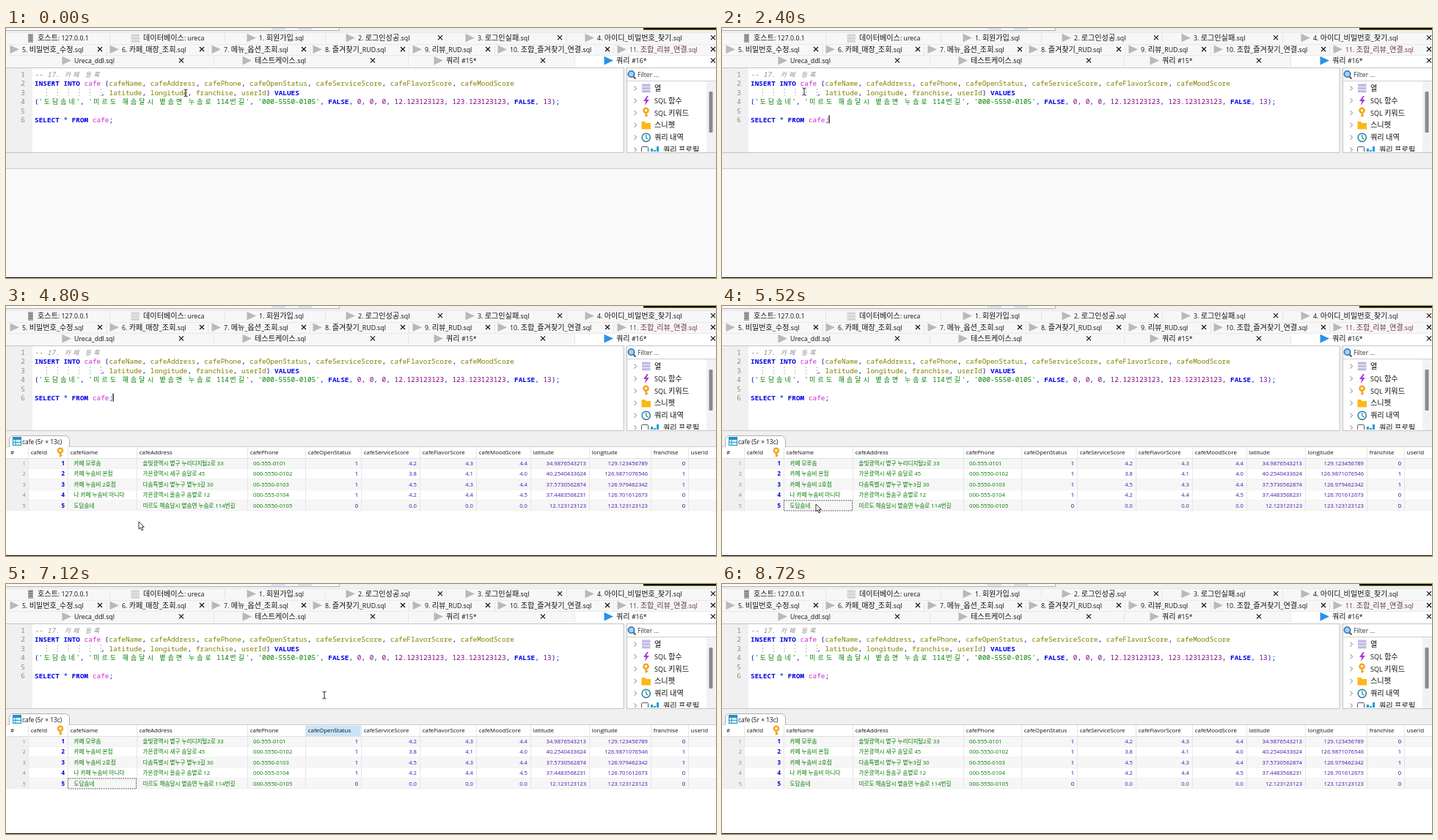
An HTML page for the animation above (8.8 s loop, 968 by 342 pixels).

```html
<!DOCTYPE html>
<html lang="ko">
<head>
<meta charset="utf-8">
<style>
html, body { margin: 0; width: 100%; height: 100%; overflow: hidden; background: #f0f0f0; }
svg { display: block; width: 968px; height: 342px; }
text { white-space: pre; font-family: "Open Sans", "Noto Sans CJK KR", "Noto Sans CJK", sans-serif; }
.code { font-family: "Noto Sans Mono", "Noto Sans CJK KR", "Noto Sans CJK", monospace; }
</style>
</head>
<body>
<svg id="stage" viewBox="0 0 968 342" xmlns="http://www.w3.org/2000/svg"></svg>
<script>
const NS = "http://www.w3.org/2000/svg";
const stage = document.getElementById("stage");
const LOOP = 8800, STEP = 80;

function add(parent, tag, attrs, content) {
  const el = document.createElementNS(NS, tag);
  for (const k in attrs) el.setAttribute(k, attrs[k]);
  if (content !== undefined) el.textContent = content;
  parent.appendChild(el);
  return el;
}
const rect = (p, x, y, width, height, fill, more) => add(p, "rect", { x, y, width, height, fill, ...more });
const path = (p, d, stroke, w = 1, fill = "none") => add(p, "path", { d, stroke, "stroke-width": w, fill });
const group = (p, attrs = {}) => add(p, "g", attrs);

// Hangul runs may take their own size beside the Latin text.
function label(p, x, y, str, size = 8.8, hangul = 10.15, fill = "#111", more = {}) {
  const el = add(p, "text", { x, y, fill, "font-size": size, ...more });
  for (const run of str.split(/([\uac00-\ud7a3]+)/)) {
    if (!run) continue;
    add(el, "tspan", /[\uac00-\ud7a3]/.test(run) ? { "font-size": hangul } : {}, run);
  }
  return el;
}

/* ---------- top strip and tabs ---------- */
rect(stage, 0, 0, 968, 342, "#f0f0f0");
rect(stage, 0, 0, 454, 3, "#f8f8f8");
rect(stage, 362, 0, 19, 2.5, "#cfe3fa");
rect(stage, 398, 0, 19, 2.5, "#cfe3fa");
path(stage, "M0 3.5H454.5V0", "#b4b4b4");
rect(stage, 869, 0, 99, 2, "#000");
rect(stage, 869, 2, 99, 1, "#8a9a20");
rect(stage, 0, 6, 968, 48, "#f7f7f7");
rect(stage, 776, 37, 192, 17, "#fff");
path(stage, "M0 6.5H968M0 22.5H968M0 37.5H968", "#e9e9e9");

const tabRows = [
  [19.5, 17.2, [141, 298, 435, 600, 764]],
  [37, 33, [137, 275, 414, 549, 666, 828]],
  [52, 48.3, [283, 548, 775]]
];
tabRows.forEach(([bottom, , xs]) => xs.forEach(x => path(stage, `M${x}.5 ${bottom - 12}V${bottom}`, "#e4e4e4")));

const tabs = [
  [0, 345, "1. 회원가입.sql"], [0, 480, "2. 로그인성공.sql", 592],
  [0, 643, "3. 로그인실패.sql", 755], [0, 806, "4. 아이디_비밀번호_찾기.sql", 964],
  [1, 22, "5. 비밀번호_수정.sql", 128], [1, 158, "6. 카페_매장_조회.sql", 267],
  [1, 297, "7. 메뉴_옵션_조회.sql", 406], [1, 435, "8. 즐겨찾기_RUD.sql", 541],
  [1, 571, "9. 리뷰_RUD.sql", 657], [1, 687, "10. 조합_즐겨찾기_연결.sql", 820],
  [1, 850, "11. 조합_리뷰_연결.sql", 964, "#6b3350"],
  [2, 93, "Ureca_ddl.sql", 239], [2, 339, "테스트케이스.sql", 500],
  [2, 600, "쿼리 #15*", 732], [2, 832, "쿼리 #16*", 964]
];
tabs.forEach(([row, x, str, close, color], i) => {
  const y = tabRows[row][1], active = i === tabs.length - 1;
  path(stage, `M${x - 16.5} ${y - 9.5}l12.5 5.8l-12.5 5.8z`, "none", 0, active ? "#2692ee" : "#b9b9b9");
  label(stage, x, y, str, 8.8, 10.15, color);
  if (close) path(stage, `M${close - 3} ${y - 7}l6 6m0 -6l-6 6`, "#111", 1.2);
});
label(stage, 43, 17.2, "호스트: 127.0.0.1");
label(stage, 187, 17.2, "데이터베이스: ureca");
rect(stage, 30, 8, 7, 12, "#a8a8a8");
path(stage, "M31 10.5H36M31 13.5H36M31 16.5H36", "#666");
for (let i = 0; i < 3; i++) rect(stage, 170.5, 8.5 + i * 4, 11.5, 3.2, "#d3d3cf");

/* ---------- editor ---------- */
rect(stage, 0, 54.5, 842, 116, "#fff", { stroke: "#c4c4c4" });
rect(stage, 0, 55, 36, 115, "#f0f0f0");

const CW = 5.638, X0 = 39, lineY = n => 67 + n * 12.45;
const keywords = /^(INSERT|INTO|VALUES|FALSE|SELECT|FROM)$/;
const lines = [
  "-- 17. 카페 등록",
  "INSERT INTO cafe (cafeName, cafeAddress, cafePhone, cafeOpenStatus, cafeServiceScore, cafeFlavorScore, cafeMoodScore",
  "                , latitude, longitude, franchise, userId) VALUES",
  "('도담솜네', '미르도 해솜달시 볕솜면 누솜로 114번길', '000-5550-0105', FALSE, 0, 0, 0, 12.123123123, 123.123123123, FALSE, 13);",
  "",
  "SELECT * FROM cafe;"
];
function styleOf(tok) {
  if (tok[0] === "'") return { fill: "#008000" };
  if (keywords.test(tok)) return { fill: "#0000e6", "font-weight": 700 };
  if (tok === "cafe") return { fill: "#d028d0" };
  if (/^[a-z]/i.test(tok)) return { fill: "#808000" };
  if (/^\d/.test(tok)) return { fill: "#800080" };
  return { fill: "#0000c8" };
}
// Hangul fills two columns, everything else one.
function putRun(str, col, y, style) {
  for (const part of str.match(/[\uac00-\ud7a3]|[^\uac00-\ud7a3]+/g)) {
    const wide = /[\uac00-\ud7a3]/.test(part);
    add(stage, "text", {
      x: X0 + col * CW + (wide ? 1.4 : 0), y, class: "code",
      "font-size": wide ? 8.8 : CW / 0.6, ...style
    }, part);
    col += wide ? 2 : part.length;
  }
  return col;
}
lines.forEach((line, n) => {
  const y = lineY(n);
  add(stage, "text", { x: 26, y, class: "code", fill: "#8a8a8a", "font-size": 9.4, "text-anchor": "end" }, n + 1);
  if (line.startsWith("--")) {
    putRun(line, 0, y, { fill: "#8c8c8c", "font-style": "italic" });
    return;
  }
  let col = 0;
  for (const tok of line.match(/\s+|'[^']*'|[A-Za-z]\w*|[\d.]+|\S/g) || []) {
    if (/^\s/.test(tok)) col += tok.length;
    else col = putRun(tok, col, y, styleOf(tok));
  }
});
for (let i = 0; i < 6; i++)
  add(stage, "path", { d: `M${55.5 + i * 14.8} 83V94`, stroke: "#b8b8b8", "stroke-dasharray": "2 2" });
const caret = rect(stage, 145.5, 119.5, 1.2, 11, "#000");

/* ---------- side panel ---------- */
rect(stage, 846.5, 54.5, 122, 116, "#fff", { stroke: "#c4c4c4" });
path(stage, "M847 72.5H968", "#d0d0d0");
add(stage, "circle", { cx: 852.5, cy: 63, r: 4.2, fill: "#9fd0f5", stroke: "#2d6fb3", "stroke-width": 1.6 });
path(stage, "M855.5 66.5l3 3", "#555", 2);
label(stage, 861, 67, "Filter ...", 8.6, 10, "#333");
add(add(stage, "clipPath", { id: "side" }), "rect", { x: 847, y: 73, width: 108, height: 96 });
const side = group(stage, { "clip-path": "url(#side)" });
["열", "SQL 함수", "SQL 키워드", "스니펫", "쿼리 내역", "쿼리 프로필"].forEach((str, i) => {
  const y = 82.5 + i * 16.8;
  path(side, `M856.5 ${y - 3}l3.2 3l-3.2 3`, "#777");
  label(side, i === 5 ? 896 : 884, y + 3.4, str, 9, 10.2);
});
function key(p, x, y) {
  add(p, "circle", { cx: x, cy: y - 2.8, r: 3.1, fill: "#fff3c0", stroke: "#f0a41c", "stroke-width": 2.4 });
  path(p, `M${x} ${y}V${y + 6}M${x} ${y + 4}h2.6`, "#f0a41c", 2.2);
}
for (let i = 0; i < 3; i++) rect(side, 867, 76.5 + i * 4.2, 11.5, 3.4, "#c3b9e3");
path(side, "M874 93l-5 7h3.4l-1.6 6l6 -8h-3.6l2.6 -5z", "none", 0, "#a736d8");
key(side, 872.5, 115.5);
path(side, "M866.5 128h4.5l1.5 2h6.5v8.5h-12.5z", "none", 0, "#fbb917");
add(side, "circle", { cx: 872.7, cy: 149.8, r: 5.6, fill: "#fff", stroke: "#267f99", "stroke-width": 1.5 });
path(side, "M872.7 146v4l2.5 2", "#267f99", 1.2);
rect(side, 866.5, 162.5, 9, 9, "#fff", { stroke: "#555", rx: 1 });
[[879, 165], [883, 167], [887, 162]].forEach(([x, y]) => rect(side, x, y, 3, 10, "#1c9be0"));
rect(stage, 955, 73, 12.5, 97, "#f2f2f2");
rect(stage, 958.5, 87, 5, 56, "#8a8a8a", { rx: 1 });

/* ---------- lower area ---------- */
rect(stage, 0, 192, 968, 150, "#fafafa");
path(stage, "M0 192.5H968", "#cfcfcf");

const result = group(stage);
rect(result, 0, 193, 968, 149, "#fff");
path(result, "M4.5 193V181.5L8 177.5H82.5L86.5 181.5V193", "#b0b0b0", 1, "#fff");
rect(result, 9.5, 179.5, 11, 11, "#d9f0fb", { stroke: "#1f8fc4" });
rect(result, 9.5, 179.5, 11, 3.5, "#1f8fc4");
path(result, "M13 180V190.5M10 186.5H20", "#1f8fc4", 0.9);
label(result, 22, 189, "cafe (5r × 13c)", 8.4);

const edges = [0, 30, 84, 178, 329, 408, 484, 564, 641, 715, 795, 879, 930, 968];
const heads = ["#", "cafeId", "cafeName", "cafeAddress", "cafePhone", "cafeOpenStatus", "cafeServiceScore",
  "cafeFlavorScore", "cafeMoodScore", "latitude", "longitude", "franchise", "userId"];
const rows = [
  "카페 모루솜|솔빛광역시 볕구 누리디지털2로 33|00-555-0101|1|4.2|4.3|4.4|34.9876543213|129.123456789|0",
  "카페 누솜비 본점|가온광역시 새구 솜달로 45|000-5550-0102|1|3.8|4.1|4.0|40.2540433624|126.9871076546|1",
  "카페 누솜비 2호점|다솜특별시 볕누구 볕누3길 30|00-5550-0103|1|4.5|4.3|4.4|37.5730562874|126.979462342|1",
  "나 카페 누솜비 아니다|가온광역시 들솜구 솜볕로 12|000-555-0104|1|4.2|4.4|4.5|37.4483568231|126.701612673|0",
  "도담솜네|미르도 해솜달시 볕솜면 누솜로 114번길|000-5550-0105|0|0.0|0.0|0.0|12.123123123|123.123123123|0"
];
const ROW = 14.4, TOP = 208;
rows.forEach((_, i) => { if (i % 2 === 0) rect(result, 30, TOP + i * ROW, 938, ROW, "#f6f6f6"); });
rect(result, 0, TOP, 30, ROW * 5, "#f0f0f0");
const hover = rect(result, 408.5, 193.5, 75, 14.5, "#cce4f7");
path(result, `M0 ${TOP}.5H968`, "#e0e0e0");
edges.slice(1, -1).forEach(x => path(result, `M${x}.5 193V280`, "#e6e6e6"));
for (let i = 1; i <= 5; i++) path(result, `M0 ${TOP + i * ROW}H968`, "#ececec", 0.7);
heads.forEach((h, i) => label(result, edges[i] + (i ? 3.8 : 6), 203.3, h, 7.9));
key(result, 74, 200.5);

rows.forEach((row, r) => {
  const y = 218 + r * ROW;
  label(result, 27, y, String(r + 1), 7.7, 7.6, "#8a8a8a", { "text-anchor": "end" });
  label(result, 80, y, String(r + 1), 7.9, 7.6, "#0000d8", { "text-anchor": "end", "font-weight": 700 });
  row.split("|").forEach((v, i) => {
    const c = i + 2;
    if (i < 3) label(result, edges[c] + [8.5, 8.5, 8][i], y, v, 7.7, 7.6, "#007a00");
    else label(result, edges[c + 1] - 4, y, v, 7.65, 7.6, /\./.test(v) ? "#4a16b0" : "#0000b0", { "text-anchor": "end" });
  });
});
const selection = rect(result, 84.5, 266, 93, 14, "none", { stroke: "#333", "stroke-dasharray": "1.5 1.5", "stroke-width": 0.9 });

rect(stage, 0, 341, 968, 1, "#000");

/* ---------- pointer ---------- */
const pointer = group(stage);
const arrow = path(pointer, "M0 0V10.2L2.4 8L4.1 12L5.9 11.2L4.2 7.4H7.3Z", "#222", 0.9, "#fff");
const beam = path(pointer, "M-2.5 -5Q0 -5 0 -3.5Q0 -5 2.5 -5M0 -4V4M-2.5 5Q0 5 0 3.5Q0 5 2.5 5", "#222", 1);

// time, x, y of the pointer's stops
const stops = [
  [0, 245, 89], [400, 245, 89], [1500, 112, 87], [2480, 112, 87], [2960, 203, -6], [3680, 203, -6],
  [3840, 201, -3], [4000, 201, -3], [4640, 181, 295], [4960, 181, 295], [5440, 128, 271], [5600, 128, 271],
  [6000, 135, 295], [6240, 135, 295], [6560, 140, 303], [6800, 140, 303], [7120, 434, 152],
  [7360, 434, 152], [7920, 380, -24], [8800, 380, -24]
];
function pointerAt(t) {
  let i = 0;
  while (i < stops.length - 2 && t >= stops[i + 1][0]) i++;
  const [t0, x0, y0] = stops[i], [t1, x1, y1] = stops[i + 1];
  const u = (t - t0) / (t1 - t0), e = u * u * (3 - 2 * u);
  return [x0 + (x1 - x0) * e, y0 + (y1 - y0) * e];
}

const show = (el, on) => el.setAttribute("visibility", on ? "inherit" : "hidden");
function draw(now) {
  const t = Math.floor((now % LOOP) / STEP) * STEP;
  const [x, y] = pointerAt(t), blink = t % 1060;
  const inEditor = y > 55 && y < 170;
  show(result, t >= 3280);
  show(selection, t >= 5520 && t < 8720);
  show(hover, t >= 7040 && t < 7200);
  show(caret, t < 5520 && blink >= 100 && blink < 630);
  show(beam, inEditor);
  show(arrow, !inEditor);
  pointer.setAttribute("transform", `translate(${x.toFixed(2)} ${y.toFixed(2)})`);
}
const start = performance.now();
function tick() {
  draw(performance.now() - start);
  requestAnimationFrame(tick);
}
tick();
</script>
</body>
</html>
```
